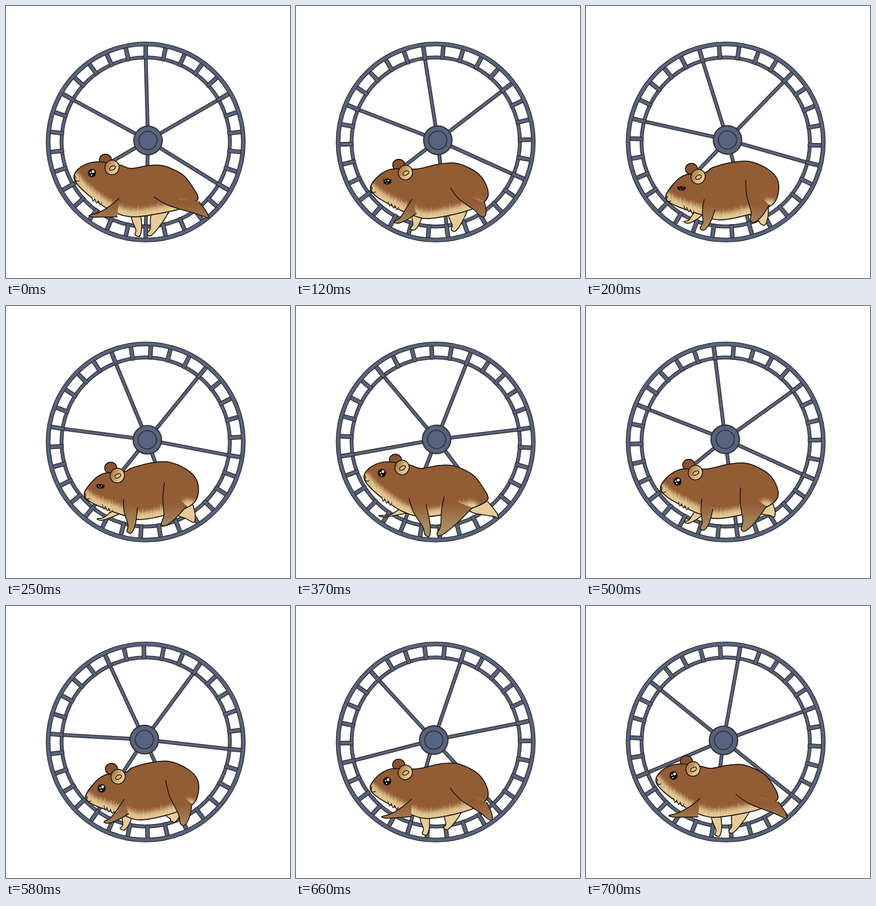
Animation of 560x534 px, one loop 750 ms. Source, as an HTML page with a canvas:

```html
<!DOCTYPE html>
<html lang="en">
<head>
<meta charset="utf-8">
<title>Hamster wheel</title>
<style>
html, body { margin: 0; width: 100%; height: 100%; overflow: hidden; background: #fff; }
canvas { display: block; width: 560px; height: 534px; }
</style>
</head>
<body>
<canvas id="stage" width="560" height="534"></canvas>
<script>
const ctx = document.getElementById('stage').getContext('2d');
const LOOP = 750, STEPS = 18, STRIDE = STEPS / 2, TAU = Math.PI * 2;
const BLUE = '#566480', EDGE = '#39312e', INK = '#211811';
const BROWN = '#925c35', CREAM = '#e6cc98', TAN = '#a98a5e';
const CX = 275.5, CY = 267;

// Body outline from the nose over the back to the chin, at both ends of a stride.
const STRETCHED = [[134,335], [149,315], [179,306], [224,312], [246,319], [283,313], [312,314], [348,331],
  [367,354], [378,380], [347,397], [310,406], [251,414], [214,405], [182,386], [147,357]];
const GATHERED = [[157,375], [172,350], [195,332], [235,327], [248,318], [283,308], [321,305], [358,320],
  [378,342], [378,372], [363,393], [315,411], [263,420], [232,411], [206,403], [170,389]];

const mix = (a, b, k) => a + (b - a) * k;
const between = (p, q, k) => [mix(p[0], q[0], k), mix(p[1], q[1], k)];
const shift = (p, dx, dy) => [p[0] + dx, p[1] + dy];
const noise = n => { const s = Math.sin(n * 127.1 + 3.7) * 43758.5453; return s - Math.floor(s); };

// Smooth curve through the points.
function curve(pts, closed) {
  const n = pts.length, path = new Path2D();
  const at = i => pts[closed ? (i + n) % n : Math.max(0, Math.min(n - 1, i))];
  path.moveTo(...at(0));
  for (let i = 0; i < (closed ? n : n - 1); i++) {
    const [a, b, c, d] = [at(i - 1), at(i), at(i + 1), at(i + 2)];
    path.bezierCurveTo(b[0] + (c[0] - a[0]) / 6, b[1] + (c[1] - a[1]) / 6,
      c[0] - (d[0] - b[0]) / 6, c[1] - (d[1] - b[1]) / 6, ...c);
  }
  return path;
}

function shape(path, fill, line = INK, width = 1.8) {
  if (fill) { ctx.fillStyle = fill; ctx.fill(path); }
  ctx.strokeStyle = line;
  ctx.lineWidth = width;
  ctx.stroke(path);
}

function oval(x, y, rx, ry, angle = 0) {
  const path = new Path2D();
  path.ellipse(x, y, rx, ry, angle, 0, TAU);
  return path;
}

function tube(path, width) {
  shape(path, null, EDGE, width);
  shape(path, null, BLUE, width - 3.2);
}

function bar(from, to, width) {
  const path = new Path2D();
  path.moveTo(...from);
  path.lineTo(...to);
  tube(path, width);
}

// Speeds up over the first stride, then runs on evenly.
function wheelTurn(step) {
  const u = step % STRIDE / STRIDE;
  return step < STRIDE ? -38.5 * u ** 1.5 : -38.5 - 81.5 * u ** .95;
}

function drawWheel(turn) {
  const rim = (deg, r) => {
    const a = (deg + turn) * TAU / 360;
    return [CX + r * Math.sin(a), CY - r * Math.cos(a)];
  };
  const hub = rim(57, 5.4);
  for (let d = 0; d < 360; d += 60) bar(hub, rim(d, 166), 7.5);
  tube(oval(CX, CY, 166, 166), 7.5);
  for (let d = 0; d < 360; d += 12) bar(rim(d, 190), rim(d, 166), 9);
  tube(oval(CX, CY, 192.5, 192.5), 9);
  shape(oval(...hub, 28, 28), BLUE, EDGE, 2.4);
  shape(oval(...hub, 18, 18), null, EDGE, 2);
}

// Leg from its front root to the toe and up to its back root.
function leg(front, back, toe) {
  const knee = shift(between(front, toe, .3), -1, 5);
  const shin = shift(between(knee, toe, .65), 4, 1);
  const calf = shift(between(toe, back, .4), 9, 2);
  return curve([front, knee, shin, toe, shift(toe, 9, 3), calf, back]);
}

function frontLeg(step, g, far) {
  const c = Math.cos(TAU * (step + .5) / STEPS);
  const toe = [209 - 46 * c, 430 - 19 * c];
  const root = far ? [toe[0] * .5 + 120, 400] : [223 + 10 * g, 378 + 2 * g];
  const back = far ? shift(root, 18, 6) : shift(root, 15 - 19 * c, 24 + 12 * c);
  return leg(root, back, toe);
}

function hindLeg(step, g, far) {
  const a = TAU * step / STEPS, c = Math.cos(a);
  const toe = [334 + 56 * c, 430 - 17 * c - 12 * Math.max(0, Math.sin(a))];
  const root = far ? [toe[0] * .4 + 178, 396] : [292 + 23 * g, 375 - 32 * g];
  const back = far ? shift(root, 44, -12) : [364 + 16 * c, 390 - 6 * c];
  return leg(root, back, toe);
}

function drawFur(edge) {
  const n = edge.length - 1, hairs = 170;
  ctx.filter = 'blur(4px)';
  shape(curve(edge), null, CREAM, 27);
  ctx.filter = 'none';
  for (let i = 0; i < hairs; i++) {
    const u = i / hairs * n, j = Math.floor(u);
    const root = between(edge[j], edge[j + 1], u - j);
    const hair = new Path2D();
    hair.moveTo(...root);
    hair.lineTo(root[0] + 3 - 6 * noise(i + 400), root[1] - 10 - 13 * noise(i));
    ctx.globalAlpha = .15 + .25 * noise(i + 200);
    shape(hair, null, i % 3 ? CREAM : '#b98d57', 1.3);
  }
  ctx.globalAlpha = 1;
}

function drawEye(x, y, open) {
  shape(oval(x, y, 8, 8.2 * open), '#080606', '#5c351c', 1.2);
  const glint = (dx, dy, r) => {
    ctx.fillStyle = '#fff';
    ctx.fill(oval(x + dx, y + dy * open, r * open, r * open));
  };
  glint(2, -3, 2.7);
  glint(-3, -1, 1.5);
  glint(-1, 4, 1.4);
  if (open < .9) shape(curve([[x - 8, y - 5 * open], [x + 8, y + 3 - 9 * open]]));
}

function drawEar(x, y) {
  const shade = ctx.createLinearGradient(x - 13, y - 6, x + 6, y + 3);
  shade.addColorStop(0, '#a8713f');
  shade.addColorStop(1, '#e2c694');
  shape(oval(x, y, 14, 14.5, .5), shade);
  shape(oval(x + 1, y + 1, 6.5, 3.8, -.5), '#d9b884', INK, 1.5);
}

function drawTuft([x, y]) {
  const path = new Path2D();
  path.moveTo(x - 13, y - 11);
  for (let i = 1; i <= 6; i++) path.lineTo(x - 14 + i * 3.5, y - 10 + i * 1.8 + (i % 2 ? 6 : -1));
  shape(path, CREAM, INK, 1.3);
}

function drawHamster(step) {
  const u = step % STRIDE / STRIDE;
  const g = Math.sin(Math.PI * u ** 1.2) ** 2;
  const pts = STRETCHED.map((p, i) => between(p, GATHERED[i], g));
  const nose = pts[0], body = curve(pts, true);
  const ear = shift(nose, 75 - 11 * g, -18 - 22 * g);
  const eye = shift(nose, 35.5 - 4 * g, -7 - 10 * g);
  const open = step < STRIDE ? 1 - .5 * g : 1;

  shape(frontLeg(step + STRIDE, g, true), CREAM);
  shape(hindLeg(step + STRIDE, g, true), CREAM);
  shape(oval(ear[0] - 13, ear[1] - 15, 12, 11), '#88532e');

  ctx.save();
  ctx.clip(body);
  ctx.fillStyle = BROWN;
  ctx.fillRect(60, 260, 400, 220);
  drawFur([...pts.slice(10), shift(nose, 0, 6)]);
  ctx.restore();
  shape(body, null, INK, 2);
  drawTuft(pts[14]);

  const coat = ctx.createLinearGradient(0, 388, 0, 432);
  coat.addColorStop(0, BROWN);
  coat.addColorStop(1, TAN);
  shape(hindLeg(step, g), coat);
  shape(frontLeg(step, g), coat);

  drawEar(...ear);
  drawEye(...eye, open);
  const mouth = [[0, -3], [3, 0], [2, 5], [5, 9], [10, 8]].map(d => shift(nose, ...d));
  shape(curve(mouth), null, INK, 1.6);
}

// Step starts fall on whole hundredths of a second.
function stepAt(t) {
  let i = STEPS - 1;
  while (i && Math.floor(i * LOOP / STEPS / 10) * 10 > t) i--;
  return i;
}

ctx.lineCap = ctx.lineJoin = 'round';
const start = performance.now();
let shown = -1;

function tick() {
  const step = stepAt((performance.now() - start) % LOOP);
  if (step !== shown) {
    shown = step;
    ctx.fillStyle = '#fff';
    ctx.fillRect(0, 0, 560, 534);
    drawWheel(wheelTurn(step));
    drawHamster(step);
  }
  requestAnimationFrame(tick);
}
tick();
</script>
</body>
</html>
```
